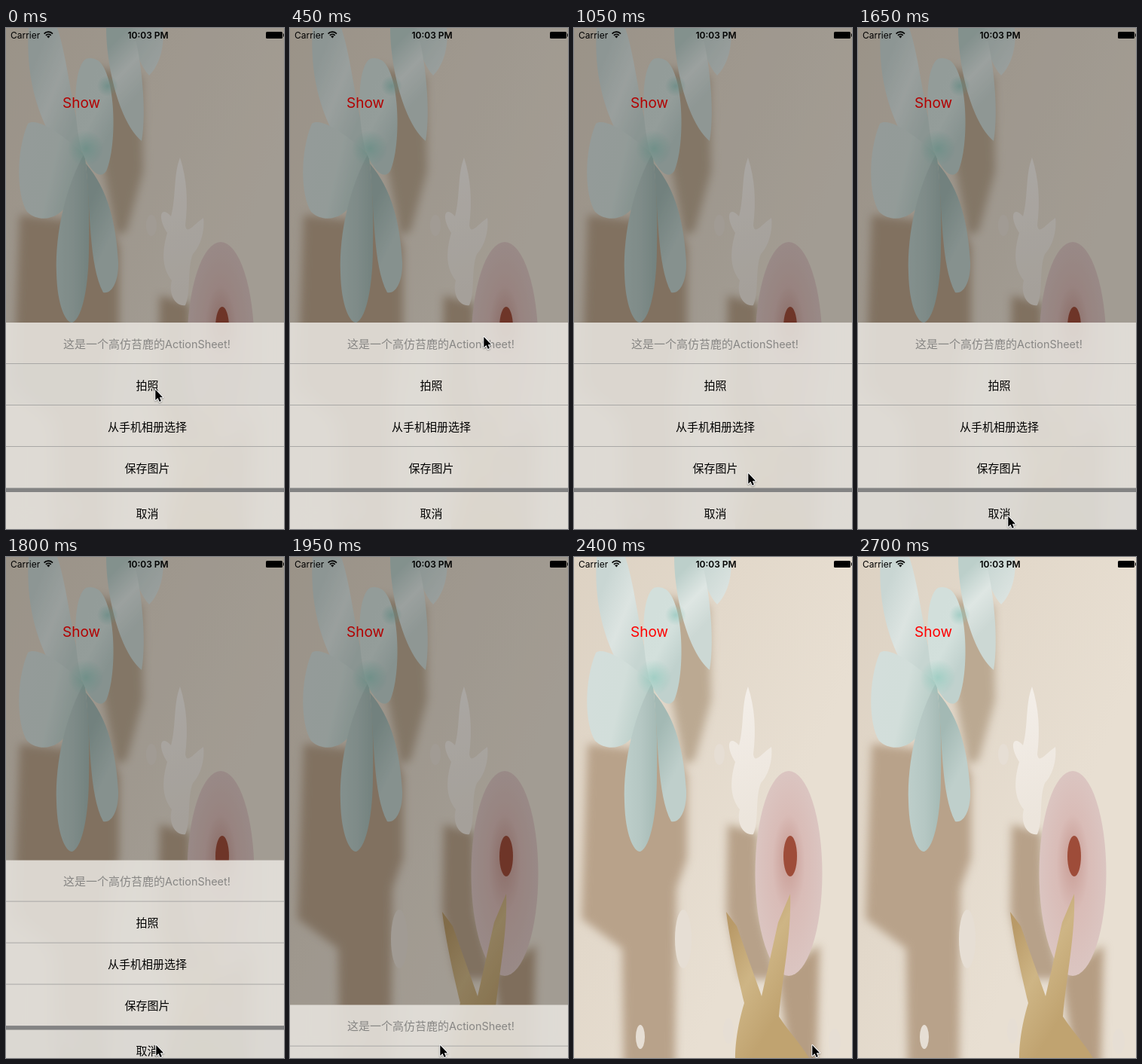
Recreate the animation shown at these times as an HTML page with a canvas. Size 369 by 665 pixels, loop 3500 ms.

```html
<!DOCTYPE html>
<html lang="zh">
<head>
<meta charset="utf-8">
<title>ActionSheet</title>
<style>
html, body { margin: 0; width: 100%; height: 100%; overflow: hidden; }
canvas { display: block; width: 369px; height: 665px; }
</style>
</head>
<body>
<canvas id="stage" width="369" height="665"></canvas>
<script>
const W = 369, H = 665, LOOP = 3500, CENTER = 187.5;
const LATIN = 'Inter, "Noto Sans CJK SC", "Noto Sans CJK", sans-serif';
const HAN = '"Noto Sans CJK SC", "Noto Sans CJK", Inter, sans-serif';
const ctx = document.getElementById('stage').getContext('2d');

// Start time, then pointer tip; the picture holds between entries.
const pointerSteps = [
  [0, 198, 479], [300, 232, 451], [450, 257, 409], [600, 255, 411],
  [750, 237, 506], [900, 236, 544], [1050, 231, 590], [1200, 201, 647],
  [1350, 199, 647], [2100, 199, 641], [2250, 252, 634], [2400, 316, 647],
  [2550, 322, 656], [2700, 400, 700]
];
const sheetSteps = [[0, 391], [1800, 402.6], [1950, 594.6], [2100, H]];
const stepAt = (steps, t) => steps.filter(s => s[0] <= t).pop();

function layer(draw) {
  const canvas = document.createElement('canvas');
  canvas.width = W;
  canvas.height = H;
  draw(canvas.getContext('2d'));
  return canvas;
}

function gradient(c, x0, y0, x1, y1, ...colors) {
  const g = c.createLinearGradient(x0, y0, x1, y1);
  colors.forEach((color, i) => g.addColorStop(i / (colors.length - 1), color));
  return g;
}

function shape(c, fill, d) {
  c.fillStyle = fill;
  c.fill(new Path2D(d));
}

function oval(c, fill, x, y, rx, ry, tilt = 0) {
  c.fillStyle = fill;
  c.beginPath();
  c.ellipse(x, y, rx, ry, tilt, 0, Math.PI * 2);
  c.fill();
}

function glow(c, x, y, r, rgb) {
  const g = c.createRadialGradient(x, y, 0, x, y, r);
  g.addColorStop(0, `rgba(${rgb},.65)`);
  g.addColorStop(1, `rgba(${rgb},0)`);
  oval(c, g, x, y, r, r);
}

function paintBeach(c) {
  c.fillStyle = gradient(c, 0, 0, W, 150, '#ddd2c3', '#e2d8ca', '#e8dfd2');
  c.fillRect(0, 0, W, H);

  c.filter = 'blur(6px)';
  shape(c, '#bba992', 'M110 50 L180 65 L182 190 L160 270 L146 275 L130 190Z');
  shape(c, '#b8a28a', 'M18 248 L80 255 L106 200 L150 290 L150 400 L136 440 L134 690 L66 690 L64 520 L10 480Z');
  shape(c, '#b7a189', 'M204 355 L244 366 L246 470 L270 560 L222 560 L202 470Z');
  shape(c, '#b59d83', 'M270 556 L326 515 L322 690 L290 690Z');
  c.filter = 'none';

  shape(c, gradient(c, 150, 0, 208, 40, '#bfd0cc', '#dbe3e0'),
    'M164 0 L208 0 C211 28 202 51 190 63 C178 51 170 25 164 0Z');
  shape(c, gradient(c, 133, 30, 184, 80, '#bccfca', '#dee6e3', '#ccd8d4'),
    'M133 0 C133 50 150 125 180 150 C187 110 180 40 168 0Z');
  shape(c, gradient(c, 30, 60, 104, 90, '#c9d6d3', '#dce4e1', '#c6d5d1'),
    'M30 0 C26 60 40 110 62 148 Q80 168 105 163 C88 115 82 40 68 0Z');
  shape(c, gradient(c, 17, 180, 104, 200, '#d3dedb', '#d2deda', '#b4cac4'),
    'M104 168 C82 148 43 117 29 127 C13 165 14 222 28 244 C45 260 72 253 82 232Z');
  shape(c, gradient(c, 67, 280, 110, 280, '#bdceca', '#b5c7c3', '#a5bab5'),
    'M104 166 C80 210 65 270 67 325 C68 370 80 392 88 391 C102 385 110 340 110 290 C111 240 109 200 104 166Z');
  shape(c, gradient(c, 108, 240, 148, 260, '#a3b9b4', '#bfcfcb'),
    'M106 180 C112 240 110 315 129 351 C141 354 150 335 149 310 C146 260 136 215 106 180Z');
  shape(c, gradient(c, 92, 100, 144, 130, '#d2dfdb', '#d3e0dc', '#c0d1cd'),
    'M106 41 C90 52 88 112 100 162 C110 188 124 203 133 190 C148 155 146 60 122 43 Q114 38 106 41Z');
  glow(c, 106, 160, 24, '140,200,187');
  glow(c, 135, 77, 14, '140,196,186');

  shape(c, gradient(c, 210, 180, 262, 340, '#f3eee8', '#ece5dc'),
    'M231 172 C222 195 226 225 219 250 C206 235 200 250 214 272 C206 300 208 320 220 335 C215 355 226 370 238 368 C246 350 240 320 248 300 C258 290 264 270 262 252 C248 262 240 275 238 262 C242 230 240 200 231 172Z');

  c.save();
  c.translate(285, 420);
  c.scale(1, 3.02);
  const urchin = c.createRadialGradient(0, -7, 6, 0, 0, 45);
  urchin.addColorStop(0, '#cca39c');
  urchin.addColorStop(.4, '#d9bcb7');
  urchin.addColorStop(1, '#dbc5c1');
  oval(c, urchin, 0, 0, 44.5, 45);
  c.restore();
  oval(c, '#9e4c39', 287, 397, 9, 27);

  shape(c, gradient(c, 202, 500, 300, 560, '#b99a68', '#ceb585', '#c0a370'),
    'M202 471 C206 505 217 555 226 592 C216 625 214 650 214 665 L312 665 C300 645 285 630 272 610 C276 560 289 500 287 447 L271 485 L249 583 L216 490Z');

  const shell = '#e6ded4';
  oval(c, shell, 145, 507, 11, 39);
  oval(c, shell, 205, 629, 7, 17);
  oval(c, shell, 88, 637, 6, 16);
  oval(c, shell, 346, 643, 8, 17);
  oval(c, shell, 193, 262, 7, 14);
}

const beach = layer(paintBeach);
const dimmed = layer(c => {
  c.drawImage(beach, 0, 0);
  c.fillStyle = 'rgba(0,0,0,.3)';
  c.fillRect(0, 0, W, H);
});
const frosted = layer(c => {
  c.drawImage(dimmed, 0, 0);
  c.filter = 'blur(12px)';
  c.drawImage(dimmed, 0, 0);
  c.filter = 'none';
  c.fillStyle = 'rgba(232,228,223,.88)';
  c.fillRect(0, 0, W, H);
});

function text(str, x, y, font, color, align = 'center') {
  ctx.font = font;
  ctx.fillStyle = color;
  ctx.textAlign = align;
  ctx.textBaseline = 'alphabetic';
  ctx.fillText(str, x, y);
}

function drawStatusBar() {
  text('Carrier', 6, 13.5, `12px ${LATIN}`, '#000', 'left');
  text('10:03 PM', 188.5, 13.5, `600 12px ${LATIN}`, '#000');
  ctx.strokeStyle = '#000';
  ctx.lineWidth = 1.7;
  for (const r of [4.6, 7.8]) {
    ctx.beginPath();
    ctx.arc(56.3, 13, r, -Math.PI * .76, -Math.PI * .24);
    ctx.stroke();
  }
  shape(ctx, '#000', 'M56.3 13.4 L54.2 11 Q56.3 9.3 58.4 11Z');
  ctx.beginPath();
  ctx.roundRect(345, 5, 22, 9, 1.5);
  ctx.fill();
  ctx.fillRect(368, 7.5, 1, 4);
}

function drawSheet(top, pressed) {
  ctx.save();
  ctx.beginPath();
  ctx.rect(0, top, W, H - top);
  ctx.clip();
  ctx.drawImage(frosted, 0, 0);
  ctx.translate(0, top);

  if (pressed !== null) {
    ctx.fillStyle = 'rgba(205,208,204,.25)';
    ctx.fillRect(0, pressed, W, 54);
  }
  ctx.fillStyle = '#a9a8a6';
  for (const y of [54, 109, 164]) ctx.fillRect(0, y, W, 1);
  ctx.fillStyle = '#838383';
  ctx.fillRect(0, 219.5, W, 5.5);

  text('这是一个高仿苔鹿的', 76, 33.5, `15px ${HAN}`, '#878684', 'left');
  text('ActionSheet!', 211, 33.5, `14.4px ${LATIN}`, '#878684', 'left');
  const rows = [['拍照', 88.5], ['从手机相册选择', 143.5], ['保存图片', 198.5], ['取消', 258.5]];
  for (const [label, y] of rows) text(label, CENTER, y, `15px ${HAN}`, '#000');
  ctx.restore();
}

function drawPointer(x, y) {
  const arrow = new Path2D('M0 0 V14 L3.2 11 L5.4 16 L7.6 15 L5.5 10.2 H9.8Z');
  ctx.save();
  ctx.translate(x + .3, y + 1);
  ctx.lineJoin = 'round';
  ctx.strokeStyle = '#fff';
  ctx.lineWidth = 2;
  ctx.shadowColor = 'rgba(0,0,0,.35)';
  ctx.shadowBlur = 2;
  ctx.shadowOffsetY = 1;
  ctx.stroke(arrow);
  ctx.shadowColor = 'transparent';
  ctx.fillStyle = '#000';
  ctx.fill(arrow);
  ctx.restore();
}

function pressedRow(t) {
  if (t < 450) return 55;
  return t >= 1650 && t < 2100 ? 225 : null;
}

function draw(t) {
  const sheetTop = stepAt(sheetSteps, t)[1];
  const open = sheetTop < H;
  const [, x, y] = stepAt(pointerSteps, t);
  ctx.drawImage(open ? dimmed : beach, 0, 0);
  text('Show', 100, 106, `19px ${LATIN}`, open ? '#b30000' : '#ff0000');
  drawStatusBar();
  if (open) drawSheet(sheetTop, pressedRow(t));
  drawPointer(x, y);
}

const start = performance.now();
function tick() {
  draw((performance.now() - start) % LOOP);
  requestAnimationFrame(tick);
}
tick();
</script>
</body>
</html>
```
